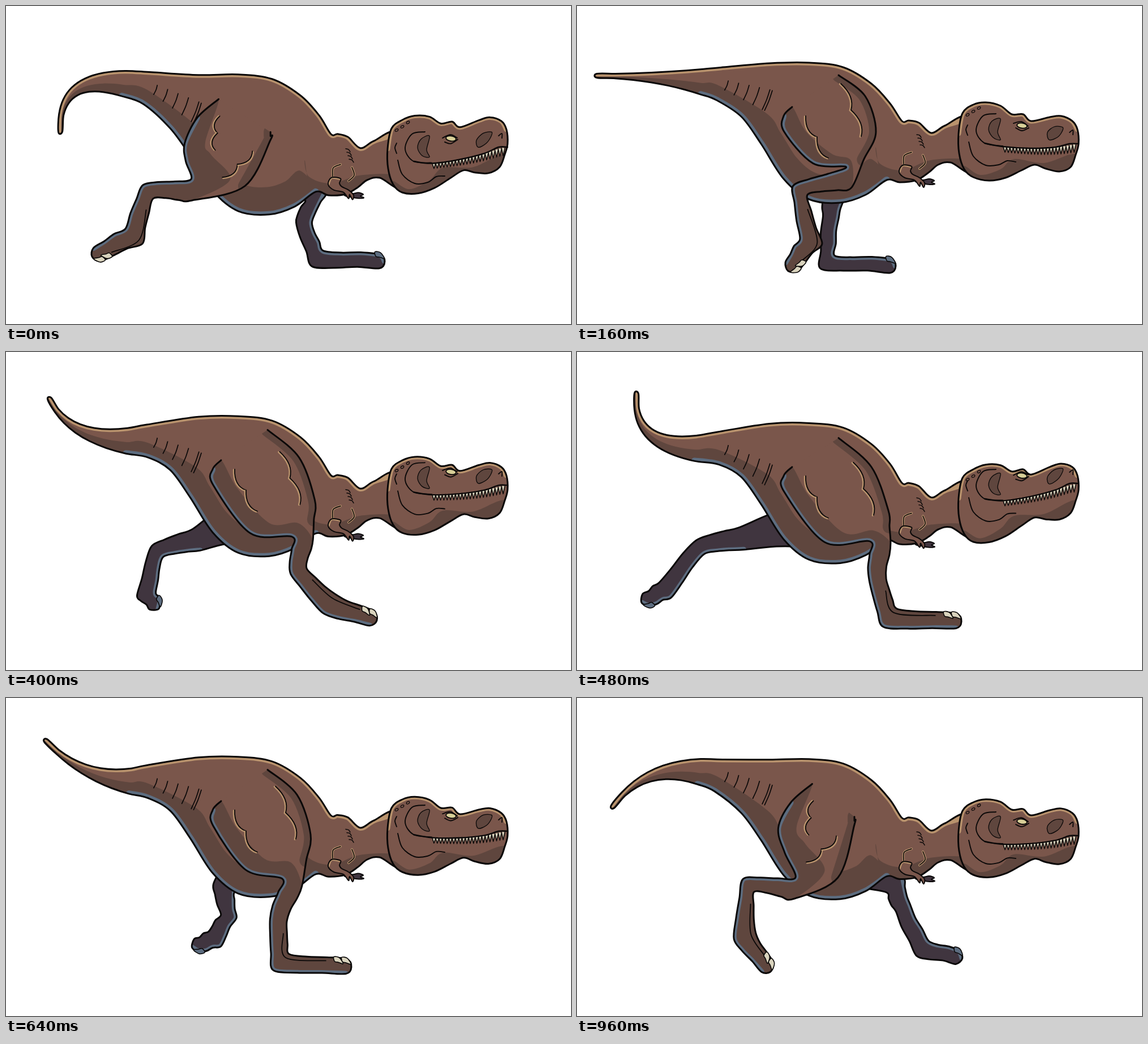
Recreate the animation shown at these times as an HTML page with a canvas. Size 998x561 px, loop 1.04 s.

```html
<!DOCTYPE html>
<html lang="en">
<head>
<meta charset="utf-8">
<title>Running dinosaur</title>
<style>
html, body { margin: 0; width: 100%; height: 100%; overflow: hidden; background: #fff; }
canvas { display: block; width: 100vw; height: 100vh; }
</style>
</head>
<body>
<canvas id="stage" width="998" height="561"></canvas>
<script>
const ctx = document.getElementById('stage').getContext('2d');
const STEP = 80, STEPS = 13;
const SKIN = '#7a564b', SHADE = '#5f463e', TAN = '#b9936d', BLUE = '#5d6d80';
const DARK = '#40353f', CREAM = '#d9d3bd', INK = '#0a0808';

// Each joint has seven keys, two steps apart.
const nearLeg = {
  knee: '328,324 480,302 505,318 535,335 505,325 462,328 385,335',
  hock: '250,327 393,325 484,366 530,402 480,392 427,392 302,330',
  heel: '225,405 412,415 562,420 552,470 485,467 428,467 295,420',
  toe: '160,438 378,460 588,466 670,475 601,474 542,474 336,476'
};
const farLeg = {
  knee: '545,335 455,330 400,333 290,328 384,335 490,335 560,330',
  hock: '525,382 447,372 350,365 217,343 392,385 530,362 575,372',
  heel: '550,446 442,452 375,435 155,420 368,425 532,392 610,442',
  toe: '660,450 554,458 446,455 122,438 337,437 532,412 672,457'
};
const torso = {
  lift: '27 0 -2 33 5 -10 10',
  tip: '96,222 35,123 43,95 105,73 70,75 34,101 63,192',
  bend: '90,105 150,124 140,140 95,178 140,150 150,112 125,105',
  cheek: '32 0 -8 17 -1 -11 11',
  nose: '6 0 -4 -11 -8 3 0'
};

const P = s => s.split(' ').map(p => p.split(',').map(Number));
const mix = (p, q, t) => p.map((v, i) => v + (q[i] - v) * t);
const add = (p, x, y) => [p[0] + x, p[1] + y];
const ramp = (x, x0, x1, u, v) => u + (v - u) * Math.min(1, Math.max(0, (x - x0) / (x1 - x0)));
const unit = (p, q) => {
  const x = q[0] - p[0], y = q[1] - p[1], d = Math.hypot(x, y) || 1;
  return [x / d, y / d];
};

// Even steps are keys; odd steps lie on a cubic through four keys.
function sample(track, step) {
  const keys = P(track), n = keys.length, k = step >> 1;
  if (step % 2 === 0) return keys[k];
  const [a, b, c, d] = [-1, 0, 1, 2].map(i => keys[(k + i + n) % n]);
  return b.map((v, i) => (9 * (v + c[i]) - a[i] - d[i]) / 16);
}
const pose = (tracks, step) => Object.values(tracks).map(t => sample(t, step));

function curve(p, closed) {
  const path = new Path2D(), n = p.length;
  const at = i => closed ? p[(i + n) % n] : p[Math.min(n - 1, Math.max(0, i))];
  path.moveTo(...p[0]);
  for (let i = 0; i < (closed ? n : n - 1); i++) {
    const [a, b, c, d] = [at(i - 1), at(i), at(i + 1), at(i + 2)];
    path.bezierCurveTo(b[0] + (c[0] - a[0]) / 6, b[1] + (c[1] - a[1]) / 6,
      c[0] - (d[0] - b[0]) / 6, c[1] - (d[1] - b[1]) / 6, c[0], c[1]);
  }
  if (closed) path.closePath();
  return path;
}
function fill(path, color) { ctx.fillStyle = color; ctx.fill(path); }
function line(path, width = 2, color = INK) {
  ctx.lineWidth = width;
  ctx.strokeStyle = color;
  ctx.stroke(path);
}
function inside(path, paint) {
  ctx.save();
  ctx.clip(path);
  paint();
  ctx.restore();
}
function oval(x, y, rx, ry, turn) {
  const path = new Path2D();
  path.ellipse(x, y, rx, ry, turn, 0, 7);
  return path;
}

// Two sides of a chain of joints, with slightly knobbly skin.
function limb(joints, widths) {
  const last = joints.length - 1, front = [], back = [];
  const normals = joints.map((p, i) => {
    const a = unit(joints[Math.max(0, i - 1)], p), b = unit(p, joints[Math.min(last, i + 1)]);
    const d = unit([0, 0], [a[0] + b[0], a[1] + b[1]]);
    return [d[1], -d[0]];
  });
  for (let k = 0; k <= last * 3; k++) {
    const i = Math.min(last - 1, Math.floor(k / 3)), t = k / 3 - i;
    const p = mix(joints[i], joints[i + 1], t), n = mix(normals[i], normals[i + 1], t);
    const w = widths[i] + (widths[i + 1] - widths[i]) * t, bump = 1.5 * Math.sin(k * 2.4);
    front.push(add(p, n[0] * (w + bump), n[1] * (w + bump)));
    back.unshift(add(p, -n[0] * (w - bump), -n[1] * (w - bump)));
  }
  const d = unit(joints[last - 1], joints[last]);
  return { front, back, tip: add(joints[last], d[0] * 9, d[1] * 9), toe: joints[last], d };
}

function claw({ toe, d }, setBack, color) {
  const place = (u, v) => [toe[0] + d[0] * u + d[1] * v, toe[1] + d[1] * u - d[0] * v];
  const shape = curve([[-9, 16], [1, 15], [8, 5], [-1, 7], [-7, 8]].map(([u, v]) => place(u - setBack, v)), true);
  fill(shape, color);
  line(shape, 1.6);
}

function drawFarSide(step, lift) {
  const hand = curve(P('596,302 610,307 622,305 631,308 626,311 632,314 623,315 610,313 598,310')
    .map(p => add(p, 0, lift * 0.9)), true);
  fill(hand, DARK);
  line(hand);
  const leg = limb([[450, 270 + lift * 0.75], ...pose(farLeg, step)], [45, 20, 14, 17, 12]);
  const shape = curve([...leg.front, leg.tip, ...leg.back], true);
  fill(shape, DARK);
  inside(shape, () => line(curve([...leg.front.slice(3), leg.tip]), 10, BLUE));
  line(shape, 3);
  claw(leg, 0, BLUE);
}

// The tail is a quadratic curve with a quickly tapering width.
function tailSides(root, bend, tip) {
  const top = [], low = [];
  for (let i = 0; i <= 7; i++) {
    const t = i / 7, a = mix(root, bend, t), b = mix(bend, tip, t);
    const p = mix(a, b, t), d = unit(a, b), w = 3.5 + 25.5 * (1 - t) ** 1.9;
    top.unshift(add(p, -d[1] * w, d[0] * w));
    low.push(add(p, d[1] * w, -d[0] * w));
  }
  return { top, low };
}

const BACK = P('340,101 410,100 470,108 520,137 553,172');
const BELLY = P('547,307 510,333 465,347 410,341 365,305 325,243 290,195');
const NECK_TOP = P('574,203 586,202 604,206 626,224 650,211 690,199');
const NECK_LOW = P('700,292 660,276 638,280 622,293 600,307 570,311');
const CHEST = P('528,250 535,278 575,290 625,272 690,272 700,300 600,318 545,318');

function drawBody(step, lift, outer) {
  const tip = sample(torso.tip, step), bend = sample(torso.bend, step);
  const root = [250, 100 + bend[1] * 0.3 + lift * 0.5];
  const tail = tailSides(root, bend, tip), raise = p => add(p, 0, lift * 0.77);
  const belly = BELLY.map(raise);
  const ridge = [...tail.top, ...BACK.map(raise), ...NECK_TOP.map(outer)];
  const body = curve([...ridge, ...NECK_LOW.map(outer), ...belly, ...tail.low], true);
  fill(body, SKIN);
  inside(body, () => {
    const core = [450, 175 + lift * 0.75], tops = tail.top.slice().reverse();
    const inner = [...belly.map(p => mix(p, core, 0.28)), ...tail.low.map((p, i) => mix(p, tops[i], 0.45))];
    fill(curve([...belly, ...tail.low, ...inner.reverse()], true), SHADE);
    fill(curve(CHEST.map(outer), true), SHADE);
    line(curve(ridge), 10, TAN);
    line(curve([...belly, ...tail.low.slice(0, 2)]), 12, BLUE);
  });
  line(body, 3);

  for (let i = 0; i < 6; i++) {
    const u = i === 5 ? 1.06 : i / 4, k = 0.45 + Math.min(i, 4) * 0.13;
    const x = 264 + 70 * u, y = root[1] + 3 + (25 + lift * 0.5) * u;
    line(curve([[x + 7 * k, y - 18 * k], [x + 1, y], [x - 7 * k, y + 18 * k]]), 1.7);
  }
  for (let i = 0; i < 4; i++) {
    const x = 601 + i * 2, y = 227 + i * 6;
    line(curve([[x - 1, y], [x + 4, y + 1], [x + 7, y + 5]].map(outer)), 1.5);
  }
}

// A row of rounded muscle folds from p to q.
function folds(p, q, count, depth) {
  const d = unit(p, q);
  for (let i = 0; i < count; i++) {
    const a = mix(p, q, i / count), b = mix(p, q, (i + 1) / count);
    const c = add(mix(a, b, 0.6), d[1] * depth, -d[0] * depth);
    for (const [shift, width, color] of [[2, 3, TAN], [0, 1.8, INK]]) {
      const arc = new Path2D();
      arc.moveTo(a[0] - d[1] * shift, a[1] + d[0] * shift);
      arc.quadraticCurveTo(c[0] - d[1] * shift, c[1] + d[0] * shift, b[0] - d[1] * shift, b[1] + d[0] * shift);
      line(arc, width, color);
    }
  }
}

function drawNearLeg(step, lift) {
  const joints = pose(nearLeg, step), kx = joints[0][0];
  const leg = limb(joints, [19, 15, 20, 13]), rise = lift * 0.75;
  const ahead = ramp(kx, 395, 450, 0, 1);

  // The thigh swells between hip and knee; its outline follows the knee.
  const front = [474 + (kx - 345) * 0.4, 216 + rise + Math.max(0, kx - 470) * 0.6];
  const rear = [366 - Math.max(0, 400 - kx) * 0.7, 222 + rise];
  const start = mix(add(front, 0, -14), [462, 122 + lift * 0.9], ahead);
  const upper = add(mix(start, front, 0.5), 14 * ahead, -13 * ahead);
  const lower = add(mix(front, leg.front[0], 0.5), 24 * (1 - ahead), 28 * (1 - ahead));
  const kneeBack = leg.back[leg.back.length - 1];
  const under = add(mix(kneeBack, rear, 0.5), -4, Math.max(0, (kneeBack[0] - rear[0] - 60) * 0.5));
  const end = add(rear, ...mix([60, -78], [14, -44], ahead));
  const bow = add(mix(rear, end, 0.5), -8, -6);

  const frontEdge = [start, upper, front, lower];
  const rearEdge = [...leg.back, under, rear, bow, end];
  const all = [...frontEdge, ...leg.front, leg.tip, ...rearEdge];
  const edge = curve(all), area = new Path2D(edge);
  area.closePath();
  fill(area, SKIN);
  inside(area, () => {
    line(curve(frontEdge), 24, SHADE);
    const inner = [mix(rear, front, 0.24), mix(under, front, 0.3), mix(under, lower, 0.75)];
    fill(curve([...leg.front, leg.tip, ...rearEdge, ...inner], true), SHADE);
    line(curve(rearEdge.slice(0, -1)), 10, BLUE);
  });
  line(edge, 3);

  const fa = add(front, ...mix([-85, 66], [-62, -85], ahead));
  const fb = add(front, ...mix([-32, 20], [-26, 8], ahead));
  folds(fa, fb, 2, 15 * (2 * ahead - 1));
  folds(add(rear, ...mix([62, -48], [38, -28], ahead)), add(rear, ...mix([54, 12], [78, 46], ahead)), 2, -15);

  const n = leg.back.length - 1;
  line(curve([4, 6, 8].map(i => mix(leg.front[i], leg.back[n - i], 0.22))), 1.8);
  claw(leg, 14, CREAM);
  claw(leg, 0, CREAM);
}

const ARM = P('592,280 576,278 570,290 580,300 597,304 606,315 608,308 613,317 615,309 606,300 594,294 590,288');
const BICEP = ['592,255 579,261 578,276', '612,260 616,274 606,284'].map(P);

function drawArm(lift) {
  const move = p => add(p, -1, 3 + lift * 0.8);
  for (const b of BICEP) {
    line(curve(b.map(move)), 4, TAN);
    line(curve(b.map(move)), 1.6);
  }
  const arm = curve(ARM.map(move), true);
  fill(arm, SKIN);
  inside(arm, () => line(curve(ARM.slice(0, 3).map(move)), 5, TAN));
  line(arm);
}

const SKULL = P('674,225 681,189 700,174 722,170 748,176 768,191 788,191 802,203 835,196 855,194 875,203 884,218 886,243 881,262 872,284 852,292 828,287 808,280 785,290 757,303 728,308 700,302 684,288 675,260');
const JAW = P('682,282 712,298 748,288 772,270 825,277 882,262 890,310 740,330 680,310');
const EAR = P('748,199 733,203 727,218 735,232 748,236 743,222');
const NOSE = P('858,214 843,213 831,223 834,236 848,232 856,223');
const CHEEK = P('740,190 717,194 705,220 720,242 752,247');
const MOUTH = P('720,242 752,248 800,251 845,249 870,243 886,243');
const FACE = ['692,240 700,265 722,281 745,280 760,273 775,275', '690,210 687,218 690,228',
  '771,207 785,204 797,212', '775,215 786,220 798,215', '870,223 876,219 876,227'].map(P);

function drawHead(outer, inner) {
  const rim = SKULL.map(outer), skull = curve(rim, true);
  fill(skull, SKIN);
  inside(skull, () => {
    fill(curve(JAW.map(outer), true), SHADE);
    line(curve(rim.slice(0, 12)), 9, TAN);
  });
  line(skull, 3);
  for (const patch of [EAR, NOSE]) {
    const shape = curve(patch.map(inner), true);
    fill(shape, SHADE);
    line(shape, 1.3);
  }
  for (const l of [CHEEK, ...FACE]) line(curve(l.map(inner)), 1.9);
  for (let i = 0; i < 3; i++) line(oval(...outer([690 + i * 10, 192 - i * 6]), 3, 2, -0.5), 1.3);

  const eye = oval(...inner([786, 211]), 9, 4.5, 0.15);
  fill(eye, '#d8cf98');
  line(eye, 1.8);

  const count = 22;
  for (let i = 0; i < count; i++) {
    const t = i / count, x = 753 + 128 * t, y = 249 + 2 * Math.sin(t * 3.1) - 6 * t ** 4;
    const tooth = new Path2D();
    tooth.moveTo(...inner([x, y]));
    tooth.lineTo(...inner([x + 3, y + 9 + 5 * t]));
    tooth.lineTo(...inner([x + 6, y]));
    fill(tooth, CREAM);
    line(tooth, 1.5);
  }
  line(curve(MOUTH.map(inner)), 2.4);
}

function draw(step) {
  const [[lift], , , [cheek], [nose]] = pose(torso, step);
  // The skull pivots at the snout; the face turns a little more than its outline.
  const outer = ([x, y]) => [x, y + (x < 660 ? ramp(x, 575, 630, lift * 0.85, lift) : ramp(x, 700, 870, lift, 0))];
  const inner = ([x, y]) => [x, y + ramp(x, 740, 870, cheek, nose)];
  ctx.fillStyle = '#fff';
  ctx.fillRect(0, 0, 998, 561);
  drawFarSide(step, lift);
  drawBody(step, lift, outer);
  drawNearLeg(step, lift);
  drawHead(outer, inner);
  drawArm(lift);
}

ctx.lineCap = ctx.lineJoin = 'round';
let shown = -1;
const start = performance.now();
function tick() {
  const step = Math.floor(Math.max(0, performance.now() - start) / STEP) % STEPS;
  if (step !== shown) draw(shown = step);
  requestAnimationFrame(tick);
}
tick();
</script>
</body>
</html>
```
